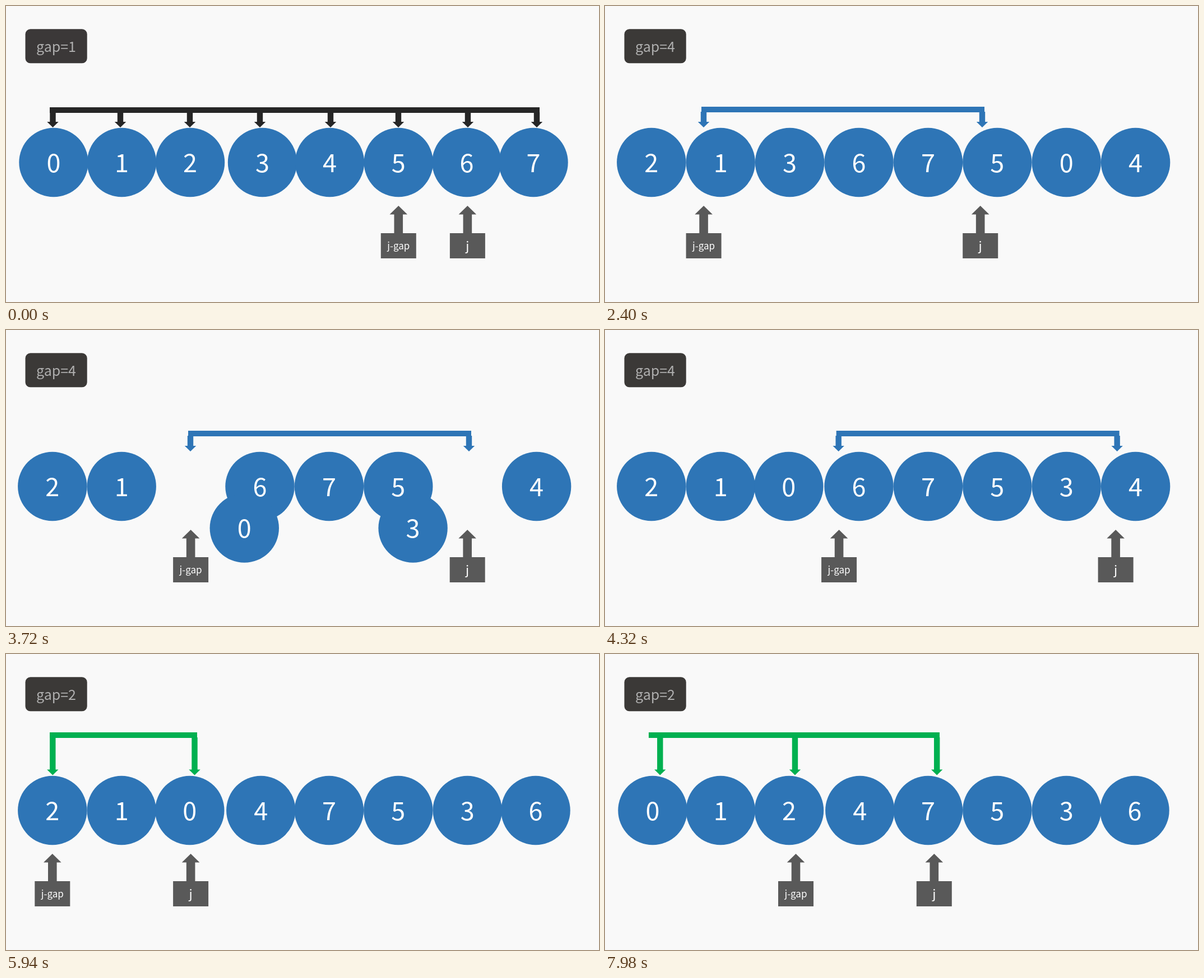
Recreate the animation shown at these times as an HTML page. Size 1058 px wide and 529 px high, loop 8000 ms.

```html
<!DOCTYPE html>
<html lang="en">
<head>
<meta charset="utf-8">
<title>Shell sort</title>
<style>
  html, body { margin: 0; width: 100%; height: 100%; overflow: hidden; background: #f9f9f9; }
  svg { display: block; width: 100vw; height: 100vh; }
  text {
    font-family: "Noto Sans CJK SC", "Noto Sans CJK JP", Lato, sans-serif;
    font-weight: 300; text-anchor: middle; fill: #fff;
  }
</style>
</head>
<body>
<svg id="stage" viewBox="0 0 1058 529"></svg>
<script>
const LOOP = 8000, TICK = 60, MOVE = 438, SWAP = 876;
const X0 = 82.8, PITCH = 123.4, ROW = 279.5;
const BLUE = '#2e75b6', GREEN = '#00b050', DARK = '#262626';
const stage = document.getElementById('stage');

function add(parent, tag, attrs = {}, text) {
  const el = document.createElementNS('http://www.w3.org/2000/svg', tag);
  for (const key in attrs) el.setAttribute(key, attrs[key]);
  if (text !== undefined) el.textContent = text;
  return parent.appendChild(el);
}

const clamp = u => Math.min(1, Math.max(0, u));
const ease = u => u < 0.5 ? 2 * u * u : 1 - 2 * (1 - u) * (1 - u);
const progress = (t, start, length) => clamp((t - start) / length);
const slot = i => X0 + PITCH * i;
const place = (el, x, y = 0) => el.setAttribute('transform', `translate(${x} ${y})`);
const show = (el, on) => el.setAttribute('visibility', on ? 'visible' : 'hidden');

// Value that glides to each [start, target] in turn.
function track(t, value, moves) {
  for (const [start, target] of moves) {
    value += (target - value) * ease(progress(t, start, MOVE));
  }
  return value;
}

function makeLabel(text, fill) {
  const g = add(stage, 'g');
  add(g, 'rect', { x: 34.5, y: 41.3, width: 110.2, height: 61, rx: 9, fill });
  add(g, 'text', { x: 89.5, y: 82, 'font-size': 25, style: 'fill:#b0b0b0' }, text);
  return g;
}

function makeBracket(fill, top, left, right, arrows, tip = 217) {
  const g = add(stage, 'g', { fill });
  add(g, 'rect', { x: left, y: top, width: right - left, height: 10 });
  for (const x of arrows) {
    add(g, 'path', { d: `M${x - 5.2} ${top + 9}h10.4V${tip - 10}h5L${x} ${tip}L${x - 10.2} ${tip - 10}h5Z` });
  }
  return g;
}

function makeBall(digit) {
  const g = add(stage, 'g');
  add(g, 'circle', { r: 61.7, fill: BLUE });
  add(g, 'text', { y: 17, 'font-size': 45 }, digit);
  return g;
}

function makePointer(text, size, baseline) {
  const g = add(stage, 'g');
  add(g, 'path', { d: 'M0 357L15.8 372.6H7.8V406H31.5V451H-31.5V406H-7.8V372.6H-15.8Z', fill: '#595959' });
  add(g, 'text', { y: baseline, 'font-size': size }, text);
  return g;
}

// Straight down, rounded bottom, straight up.
function makeArc(from, to, depth) {
  const w = to - from;
  const pt = (x, y) => `${from + w * x} ${ROW + depth * y} `;
  const path = document.createElementNS('http://www.w3.org/2000/svg', 'path');
  path.setAttribute('d', 'M' + pt(0, 0) + 'L' + pt(0.259, 0.744) +
    'C' + pt(0.311, 0.911) + pt(0.399, 1) + pt(0.492, 1) +
    'C' + pt(0.596, 1) + pt(0.684, 0.911) + pt(0.741, 0.744) + 'L' + pt(1, 0));
  const length = path.getTotalLength();
  return f => path.getPointAtLength(f * length);
}

const label = {
  one: makeLabel('gap=1', '#3b3838'),
  four: makeLabel('gap=4', '#3b3937'),
  two: makeLabel('gap=2', '#3b3937')
};
const bracket = {
  all: makeBracket(DARK, 181, 78, 952, [83.5, 204, 328, 453, 579, 700, 824, 947]),
  four: makeBracket(BLUE, 180, 79, 584, [83, 580]),
  two: makeBracket(GREEN, 140, 78, 341, [83.3, 336.5], 216.5),
  three: makeBracket(GREEN, 140, 71, 590, [91.3, 332, 585.2], 216.5)
};

const sortedX = [85, 206.5, 328.5, 457.5, 577.5, 700.3, 822, 941];
const order = [2, 1, 3, 6, 7, 5, 0, 4];
const balls = [];
order.forEach(d => { balls[d] = makeBall(d); });

const backPointer = makePointer('j-gap', 17, 435);
const pointer = makePointer('j', 22.5, 437);

const swap = (start, digit, from, to, depth) => ({ start, digit, at: makeArc(from, to, depth) });
const swaps = [
  swap(3130, 3, slot(2), slot(6), 132),
  swap(3130, 0, slot(6), 327.8, 132),
  swap(4580, 6, slot(3), 945, 126),
  swap(4580, 4, slot(7), 454.8, 126),
  swap(5967, 0, 327.8, 85, 128),
  swap(5967, 2, slot(0), 328.5, 128)
];

const FADE_IN = 1640, REGAP = 5473, TRIPLE = 7860, LAST = 7888;
const starts = [2115, 2593, 4048, REGAP, 6928, 7408, LAST];
const moves = slots => starts.map((s, i) => [s, slots[i]]);
const backMoves = moves([1, 2, 3, 0, 1, 2, 3]);
const frontMoves = moves([5, 6, 7, 2, 3, 4, 5]);

function draw(t) {
  const done = t < 720;
  const fade = progress(t, FADE_IN, MOVE);
  const cross = progress(t, REGAP, MOVE);
  const back = track(t, 0, backMoves);

  show(label.one, done);
  show(bracket.all, done);
  label.four.setAttribute('opacity', fade * (1 - cross));
  label.two.setAttribute('opacity', cross);

  bracket.four.setAttribute('fill-opacity', fade * (1 - cross));
  place(bracket.four, 123 * track(Math.min(t, REGAP), 0, backMoves));
  bracket.two.setAttribute('fill-opacity', cross);
  show(bracket.two, t < TRIPLE);
  place(bracket.two, t < 6900 ? 0 : back * PITCH);
  show(bracket.three, t >= TRIPLE);
  place(bracket.three, 79 * ease(progress(t, LAST, MOVE)));

  for (const p of [backPointer, pointer]) p.setAttribute('opacity', done ? 1 : fade);
  place(backPointer, done ? 700.3 : slot(back));
  place(pointer, done ? 823.4 : slot(track(t, 4, frontMoves)));

  order.forEach((d, i) => place(balls[d], done ? sortedX[d] : slot(i), ROW));
  for (const s of swaps) {
    if (t < s.start) continue;
    const p = s.at(ease(progress(t, s.start, SWAP)));
    place(balls[s.digit], p.x, p.y);
  }
}

const begin = performance.now();
function tick() {
  const t = (performance.now() - begin) % LOOP;
  draw(Math.floor(t / TICK) * TICK);
  requestAnimationFrame(tick);
}
tick();
</script>
</body>
</html>
```
